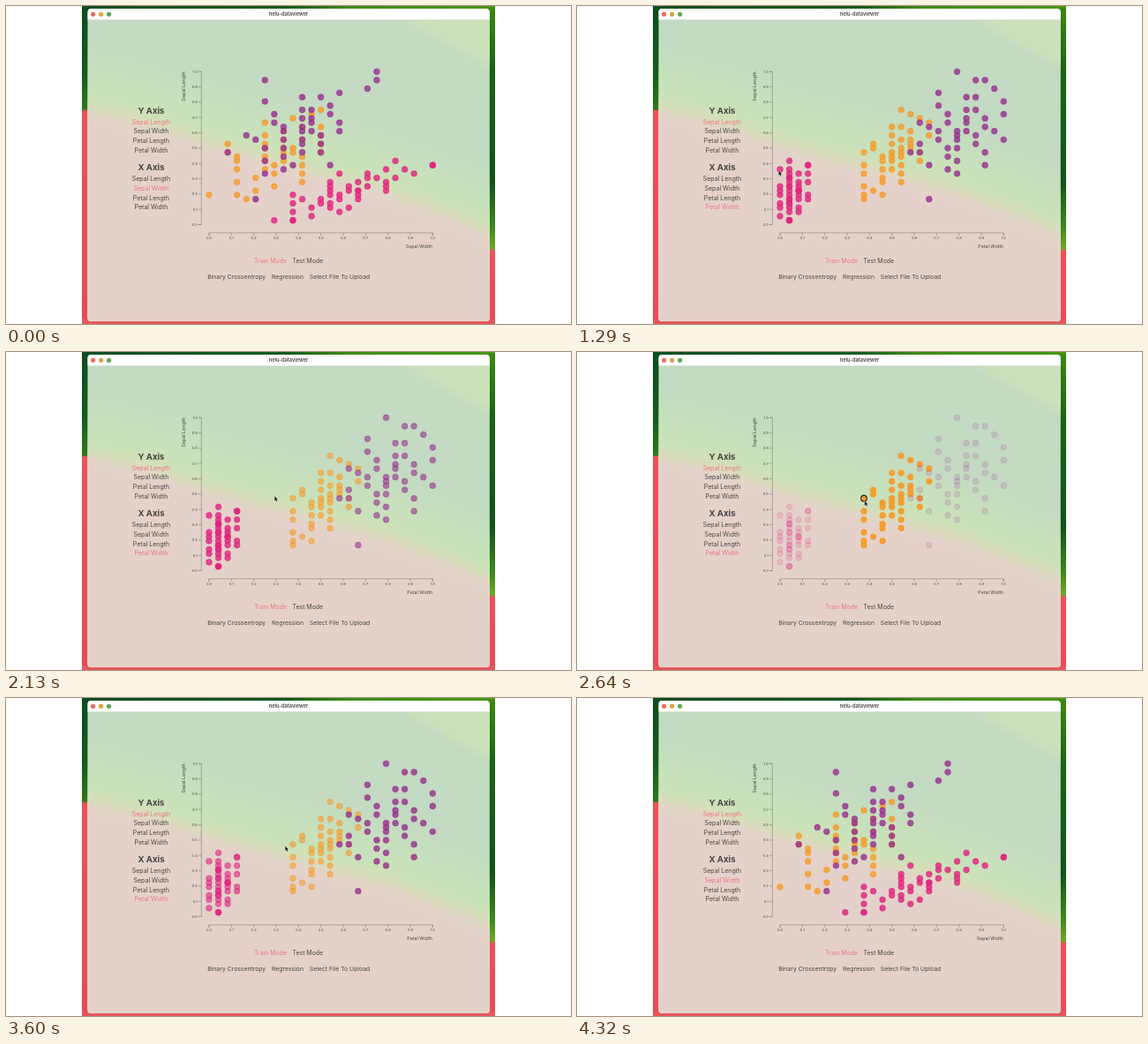
Animation, 640 px wide and 360 px high, one loop 4350 ms. Source, as an HTML page with a canvas:

```html
<!DOCTYPE html>
<html lang="en">
<head>
<meta charset="utf-8">
<title>Scatter plot</title>
<style>
  html, body { margin: 0; width: 100%; height: 100%; overflow: hidden; background: #fff; }
  canvas, svg { position: absolute; left: 0; top: 0; width: 640px; height: 360px; }
  text { font-family: Inter, "Noto Sans", sans-serif; fill: #484444; }
  .on { fill: #ee7280; }
</style>
</head>
<body>
<canvas id="back" width="640" height="360"></canvas>
<svg id="ui" viewBox="0 0 640 360"></svg>
<canvas id="plot" width="640" height="360"></canvas>
<script>
const LOOP = 4350;
const back = document.getElementById('back').getContext('2d');
const ctx = document.getElementById('plot').getContext('2d');
const ui = document.getElementById('ui');

const clamp = (v, lo = 0, hi = 1) => Math.max(lo, Math.min(hi, v));
const lerp = (a, b, k) => a + (b - a) * k;
const cubic = k => k < .5 ? 4 * k ** 3 : 1 - 4 * (1 - k) ** 3;
const smooth = k => k * k * (3 - 2 * k);

// ---- flowers ----
// Features in mm: sepal length, sepal width, petal length, petal width.
// Each feature has a mean, a spread and a correlation with sepal length.
// The first key flower is the one that gets hovered.
const KINDS = [
  {
    color: '#e0267f', count: 38,
    features: [[50.4, 3.3, 1], [34.5, 3.6, .76], [14.8, 1.5, .25], [2.3, .9, .28]],
    keys: [[54, 37, 15, 2], [57, 44, 15, 4], [55, 42, 14, 2], [44, 29, 14, 2], [58, 40, 12, 2]]
  },
  {
    color: '#f79b2b', count: 36,
    features: [[59.4, 4.8, 1], [27.8, 2.9, .55], [42.8, 4.2, .75], [13.3, 1.9, .6]],
    keys: [[60, 22, 40, 10], [50, 20, 35, 10], [62, 22, 45, 15], [49, 24, 33, 10], [70, 32, 47, 14]]
  },
  {
    color: '#98328f', count: 38,
    features: [[65, 5.2, 1], [29.8, 2.8, .4], [55.3, 4.8, .85], [20.3, 2.6, .3]],
    keys: [[60, 22, 50, 15], [79, 38, 64, 20], [77, 38, 67, 22], [77, 26, 69, 23], [49, 25, 45, 17]]
  }
];
const MIN = [43, 20, 10, 1], SPAN = [36, 24, 59, 24];
const px = v => 230 + v * 253.3;
const py = v => 247.5 - v * 173.2;

// bell-shaped spread of an even 0..1 value
function bell(p) {
  const u = 2 * p - 1;
  return 1.2 * u + .9 * u ** 3;
}
function sample(kind, i) {
  const z = bell((i + .5) / kind.count);
  return kind.features.map(([mean, spread, link], f) => {
    const noise = bell((i + 1) * Math.sqrt([1, 5, 2, 3][f]) % 1);
    const v = mean + spread * (link * z + Math.sqrt(1 - link * link) * noise);
    return clamp(Math.round(v), MIN[f], MIN[f] + SPAN[f]);
  });
}
KINDS.forEach(kind => {
  const rows = kind.keys.concat(Array.from({ length: kind.count }, (_, i) => sample(kind, i)));
  kind.dots = rows.map(row => {
    const [y, ...xs] = row.map((v, f) => (v - MIN[f]) / SPAN[f]);
    return { y: py(y), xs: xs.map(px) };
  });
});

// ---- labels and axes ----
function node(tag, attrs, str) {
  const el = document.createElementNS('http://www.w3.org/2000/svg', tag);
  for (const k in attrs) el.setAttribute(k, attrs[k]);
  if (str) el.textContent = str;
  return ui.appendChild(el);
}
const label = (str, x, y, size, anchor = 'start', more = {}) =>
  node('text', { x, y: y + size * .36, 'font-size': size, 'text-anchor': anchor, ...more }, str);
const line = d => node('path', { d, fill: 'none', stroke: '#777', 'stroke-width': .55 });

const NAMES = ['Sepal Length', 'Sepal Width', 'Petal Length', 'Petal Width'];
label('nelu-dataviewer', 320, 9.2, 5.7, 'middle', { 'font-weight': 600 });
label('Y Axis', 164.5, 118.3, 9.6, 'middle', { 'font-weight': 700 });
label('X Axis', 164.5, 183, 9.6, 'middle', { 'font-weight': 700 });
const menu = top => NAMES.map((n, i) => label(n, 164.5, top + i * 10.65, 7, 'middle'));
menu(131.3)[0].classList.add('on');
const xMenu = menu(195.9);
label('Train Mode', 281, 288.8, 6.95, 'start', { class: 'on' });
label('Test Mode', 324.5, 288.8, 6.95);
label('Binary Crossentropy', 228.2, 306.8, 6.85);
label('Regression', 301, 306.8, 6.85);
label('Select File To Upload', 343.8, 306.8, 6.85);

line(`M218 ${py(1)}H221.3V${py(0)}H218`);
line(`M${px(0)} 260V256.8H${px(1)}V260`);
for (let i = 0; i <= 10; i++) {
  const v = i / 10;
  line(`M218 ${py(v)}h3.3M${px(v)} 256.8v3.2`);
  label(v.toFixed(1), 216.8, py(v), 4.1, 'end');
  label(v.toFixed(1), px(v), 262.8, 4.1, 'middle');
}
label('Sepal Length', 0, 0, 5.4, 'end', { transform: 'translate(201.3 74.3) rotate(-90)' });
const xTitle = label(NAMES[1], 483, 272, 5.3, 'end');

// ---- desktop and window ----
function fade(x0, y0, x1, y1, ...stops) {
  const g = back.createLinearGradient(x0, y0, x1, y1);
  for (const [at, color] of stops) g.addColorStop(at, color);
  return g;
}
function shape(color, blur, ...pts) {
  back.filter = `blur(${blur}px)`;
  back.fillStyle = color;
  back.beginPath();
  for (const [x, y] of pts) back.lineTo(x, y);
  back.fill();
  back.filter = 'none';
}
// everything below the sloping edge, moved down by dy
const slope = (color, blur, dy) => shape(color, blur, ...[[40, 106], [93, 114], [160, 130], [230, 153],
  [330, 181], [430, 207], [500, 234], [600, 278]].map(([x, y]) => [x, y + dy]), [600, 420], [40, 420]);

function drawBack() {
  back.fillStyle = fade(86, 0, 554, 0, [0, '#0d4d20'], [.5, '#175a1c'], [.65, '#3f8c16'], [1, '#4a9616']);
  back.fillRect(86, 0, 468, 4);
  back.fillStyle = fade(0, 0, 0, 360, [0, '#0d4d20'], [.2, '#145a1e'], [.325, '#2c7a1c'],
    [.33, '#ef5158'], [1, '#ea4a54']);
  back.fillRect(86, 2, 8, 358);
  back.fillStyle = fade(0, 0, 0, 360, [0, '#3c8a12'], [.2, '#1c6415'], [.55, '#14521a'],
    [.7, '#3f8a1e'], [.762, '#6fa82a'], [.772, '#ef5158'], [1, '#ea4a54']);
  back.fillRect(546, 2, 8, 358);
  back.fillStyle = '#e5575c';
  back.fillRect(86, 355, 468, 5);

  back.save();
  back.beginPath();
  back.roundRect(92.5, 3, 455.3, 354, 4);
  back.clip();
  back.fillStyle = '#c3dac3';
  back.fillRect(92, 0, 457, 360);
  shape('#cfe1ba', 7, [440, 10], [560, 10], [560, 76]);
  slope('#cae3b9', 24, -48);
  slope('#d6e0b8', 7, -7);
  slope('#e4d2ca', 6, 3);
  back.fillStyle = '#fff';
  back.fillRect(92, 3, 457, 12.4);
  back.restore();

  ['#ee6a5f', '#e0a23a', '#5fa650'].forEach((c, i) => {
    back.fillStyle = c;
    back.beginPath();
    back.arc(98.6 + i * 9, 9.3, 2.6, 0, 7);
    back.fill();
  });
}

// ---- timeline ----
// start, from, to: indices of the x variable
const MOVES = [[588, 0, 1], [930, 1, 2], [3900, 2, 0]];
// start and end of the hover for each kind
const HOVERS = [[1470, 2040], [2410, 2710], [2960, 3510]];
// pointer rests: arrive, leave, x, y
const STOPS = [
  [340, 340, 161, 370], [550, 780, 161, 219.5], [900, 1010, 162, 225], [1290, 1290, 228.5, 186.5],
  [1450, 1950, 241, 195.5], [2130, 2130, 304.3, 163.3], [2400, 2720, 325.8, 168.5],
  [2940, 3430, 378, 166.5], [3600, 3600, 316.3, 167.6], [3840, 3960, 161, 205], [4220, 4220, 163, 370]
];
const HAND = 'M-.7 0Q0-.7 .7 0V2.6L3.6 3.4Q4.4 4 4 5.6L3.3 7.6H-.4L-2.4 4.8Q-2.5 3.8-.7 4.6Z';
const ARROW = 'M0 0V5.4L1.3 4.3 2.2 6.3 3 5.9 2.2 4H3.8Z';

function pointer(t) {
  const i = STOPS.findIndex(s => s[0] > t);
  if (i < 1) return null;
  const [, leave, x0, y0] = STOPS[i - 1], [arrive, , x1, y1] = STOPS[i];
  const k = smooth(clamp((t - leave) / (arrive - leave)));
  return [lerp(x0, x1, k), lerp(y0, y1, k)];
}
function drawPointer(x, y) {
  const hand = x > 142 && x < 187 && y > 191 && y < 231;
  const path = new Path2D(hand ? HAND : ARROW);
  ctx.save();
  ctx.translate(x, y);
  ctx.lineJoin = 'round';
  ctx.lineWidth = .7;
  ctx.fillStyle = hand ? '#fff' : '#222';
  ctx.strokeStyle = hand ? '#222' : '#eee';
  ctx.stroke(path);
  ctx.fill(path);
  ctx.restore();
}
// hovering one kind fades the others
function opacity(t, kind) {
  const ramp = at => cubic(clamp((t - at) / 160));
  return HOVERS.reduce((a, [start, end], i) => i === kind ? a : a - .8 * (ramp(start) - ramp(end)), 1);
}
function circle(x, y) {
  ctx.beginPath();
  ctx.arc(x, y, 3.35, 0, 7);
}

function draw(t) {
  let from = 0, to = 0, k = 0;
  for (const [start, a, b] of MOVES)
    if (t >= start) { from = a; to = b; k = cubic(clamp((t - start) / 250)); }
  xMenu.forEach((el, i) => el.classList.toggle('on', i === to + 1));
  xTitle.textContent = NAMES[to + 1];

  ctx.clearRect(0, 0, 640, 360);
  const place = d => [lerp(d.xs[from], d.xs[to], k), d.y];
  const hover = HOVERS.findIndex(([start, end]) => t >= start && t < end);
  ctx.lineWidth = .6;
  KINDS.forEach(({ color, dots }, i) => {
    const a = opacity(t, i);
    ctx.fillStyle = ctx.strokeStyle = color;
    for (const d of dots) {
      circle(...place(d));
      ctx.globalAlpha = a * (hover === i ? .95 : .82);
      ctx.fill();
      ctx.globalAlpha = a;
      ctx.stroke();
    }
  });
  ctx.globalAlpha = 1;
  if (hover >= 0) {
    ctx.strokeStyle = '#222';
    ctx.lineWidth = 1.1;
    circle(...place(KINDS[hover].dots[0]));
    ctx.stroke();
  }
  const p = pointer(t);
  if (p) drawPointer(...p);
}

drawBack();
const begin = performance.now();
function tick() {
  draw((performance.now() - begin) % LOOP);
  requestAnimationFrame(tick);
}
tick();
</script>
</body>
</html>
```
